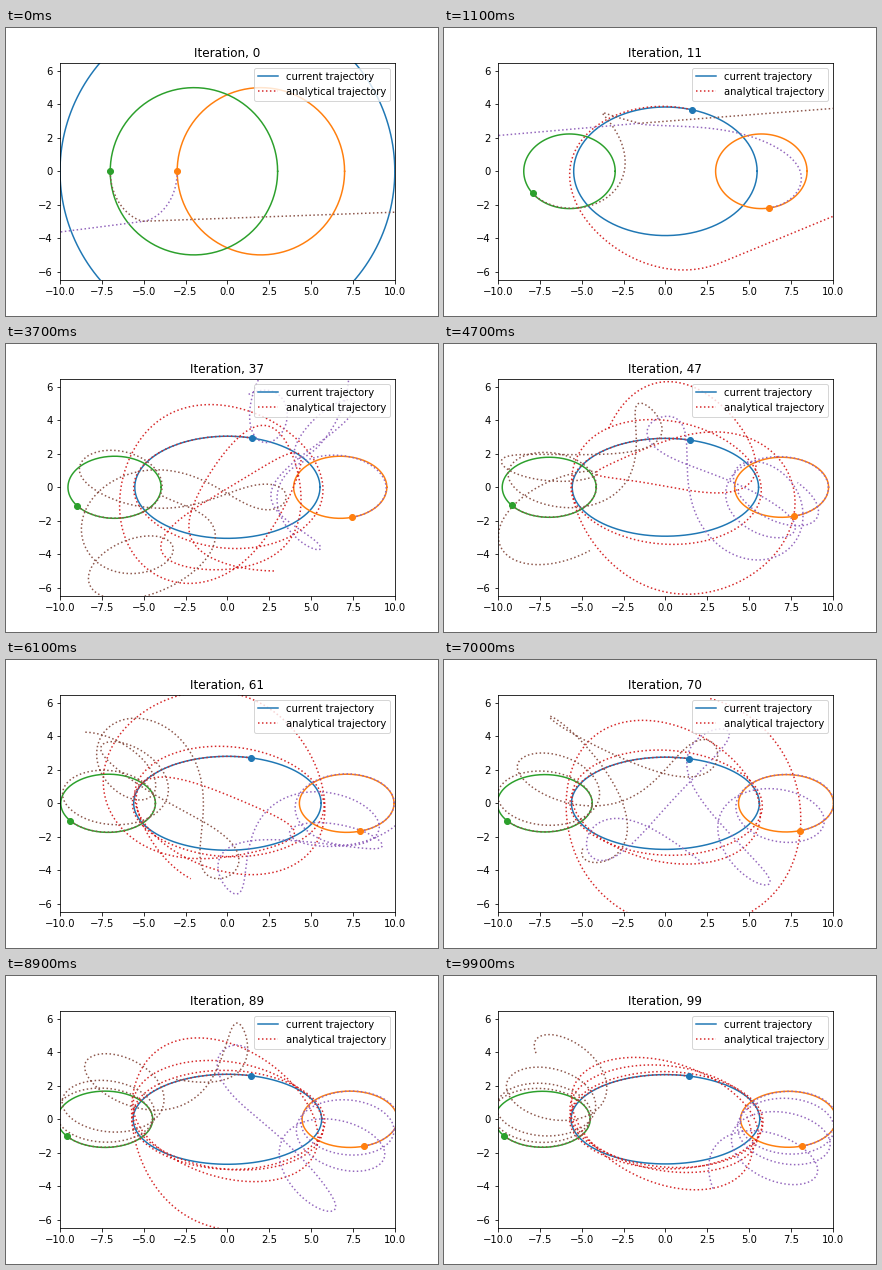
Write a matplotlib script that moves like this. It is 432 px wide and 288 px high and loops after 10000 ms.

```python
import numpy as np
import matplotlib.pyplot as plt
from matplotlib.animation import FuncAnimation

FRAMES, INTERVAL = 100, 100
OMEGA = 0.1                      # angular frequency of the starting circles
SPAN = 4 * 2 * np.pi / OMEGA     # integrated time
MAX_STEPS = 4000
CLOSE, KICK = 0.005, 14          # slingshot separation and speed

plt.rcParams.update({"font.family": "DejaVu Sans", "font.size": 10,
                     "text.kerning_factor": 6})

# Loops relax from circles to ellipses: limit + slow and fast decays.
n = np.arange(FRAMES)
slow, fast = np.exp(-0.035 * n), np.exp(-n / 3)


def relax(limit, slow_part, fast_part):
    return limit + slow_part * slow + fast_part * fast


def per_body(*cols):
    return np.stack(cols, axis=1)


shift = 7.42 - 2.48 * slow - 2.94 * fast ** 2
loop_a, loop_b = relax(2.86, -0.28, 2.42), relax(1.65, 0.756, 2.594)
a = per_body(relax(5.65, -0.43, 4.78), loop_a, loop_a)
b = per_body(relax(2.62, 1.58, 5.8), loop_b, loop_b)
cx = per_body(0 * shift, shift, -shift)
phase = np.radians(per_body(relax(75.6, -3.9, 18.3),
                            relax(287.5, -8.6, -98.9),
                            relax(217, 0, -37)))


def offsets(q):
    return q[:, None, :, :] - q[:, :, None, :]


def accel(q):
    d = offsets(q)
    r2 = (d ** 2).sum(-1) + np.eye(3)
    return (d / r2[..., None] ** 1.5).sum(2)


def nearest(q):
    r2 = (offsets(q) ** 2).sum(-1) + 1e9 * np.eye(3)
    return np.sqrt(r2.min(axis=(1, 2)))


def start_state():
    q = np.stack([cx + a * np.cos(phase), b * np.sin(phase)], axis=-1)
    tangent = np.stack([-a * np.sin(phase), b * np.cos(phase)], axis=-1)
    acc = accel(q)
    # angular rate at which gravity bends the path like the ellipse
    cross = tangent[..., 0] * acc[..., 1] - tangent[..., 1] * acc[..., 0]
    rate = np.sqrt(np.maximum(cross, 0) / (a * b))
    f = fast[:, None]
    v = tangent * (f * OMEGA + (1 - f) * rate)[..., None]
    v -= (1 - f)[..., None] * v.mean(axis=1, keepdims=True)
    return q, v


def slingshot(q, v):
    """Throw colliding bodies apart along a nearly level line."""
    aim = np.array([1, 0.082])
    for i, j in ((0, 1), (0, 2), (1, 2)):
        hit = np.hypot(*(q[:, i] - q[:, j]).T) < CLOSE
        if hit.any():
            for arr, size in ((q, CLOSE), (v, KICK)):
                mid = (arr[hit, i] + arr[hit, j]) / 2
                arr[hit, i], arr[hit, j] = mid - size * aim, mid + size * aim


def integrate():
    """RK4 for all iterations at once, each with its own adaptive step."""
    q, v = start_state()
    t, used = np.zeros(FRAMES), np.ones(FRAMES, int)
    path = [q.copy()]
    for _ in range(MAX_STEPS):
        live = t < SPAN - 1e-6
        if not live.any():
            break
        dt = np.minimum(0.05 * nearest(q) ** 1.5, 0.25)
        dt = np.where(live, np.minimum(dt, SPAN - t), 0)
        h = dt[:, None, None]
        k1 = accel(q)
        v2 = v + h / 2 * k1
        k2 = accel(q + h / 2 * v)
        v3 = v + h / 2 * k2
        k3 = accel(q + h / 2 * v2)
        v4 = v + h * k3
        k4 = accel(q + h * v3)
        q = q + h / 6 * (v + 2 * v2 + 2 * v3 + v4)
        v = v + h / 6 * (k1 + 2 * k2 + 2 * k3 + k4)
        slingshot(q, v)
        t += dt
        used += live
        path.append(q.copy())
    return np.array(path), used


path, used = integrate()

fig, ax = plt.subplots(figsize=(6, 4), dpi=72)
fig.subplots_adjust(left=0.125, right=0.9, bottom=0.125, top=0.88)
ax.set_xlim(-10, 10)
ax.set_ylim(-6.5, 6.5)
ax.set_xticks(np.arange(-10, 10.1, 2.5))
ax.set_yticks(range(-6, 7, 2))
title = ax.set_title("Iteration, 0", fontsize=12)

loops = [ax.plot([], [], color=f"C{i}")[0] for i in range(3)]
trails = [ax.plot([], [], ":", color=f"C{i + 3}")[0] for i in range(3)]
dots = [ax.plot([], [], "o", color=f"C{i}")[0] for i in range(3)]
loops[0].set_label("current trajectory")
trails[0].set_label("analytical trajectory")
ax.legend(loc="upper right")

theta = np.linspace(0, 2 * np.pi, 200)


def update(k):
    title.set_text(f"Iteration, {k}")
    for i in range(3):
        loops[i].set_data(cx[k, i] + a[k, i] * np.cos(theta),
                          b[k, i] * np.sin(theta))
        trails[i].set_data(*path[:used[k], k, i].T)
        dots[i].set_data(*path[:1, k, i].T)
    return loops + trails + dots + [title]


anim = FuncAnimation(fig, update, frames=FRAMES, interval=INTERVAL,
                     repeat=True, repeat_delay=0, blit=False)
plt.show()
```
